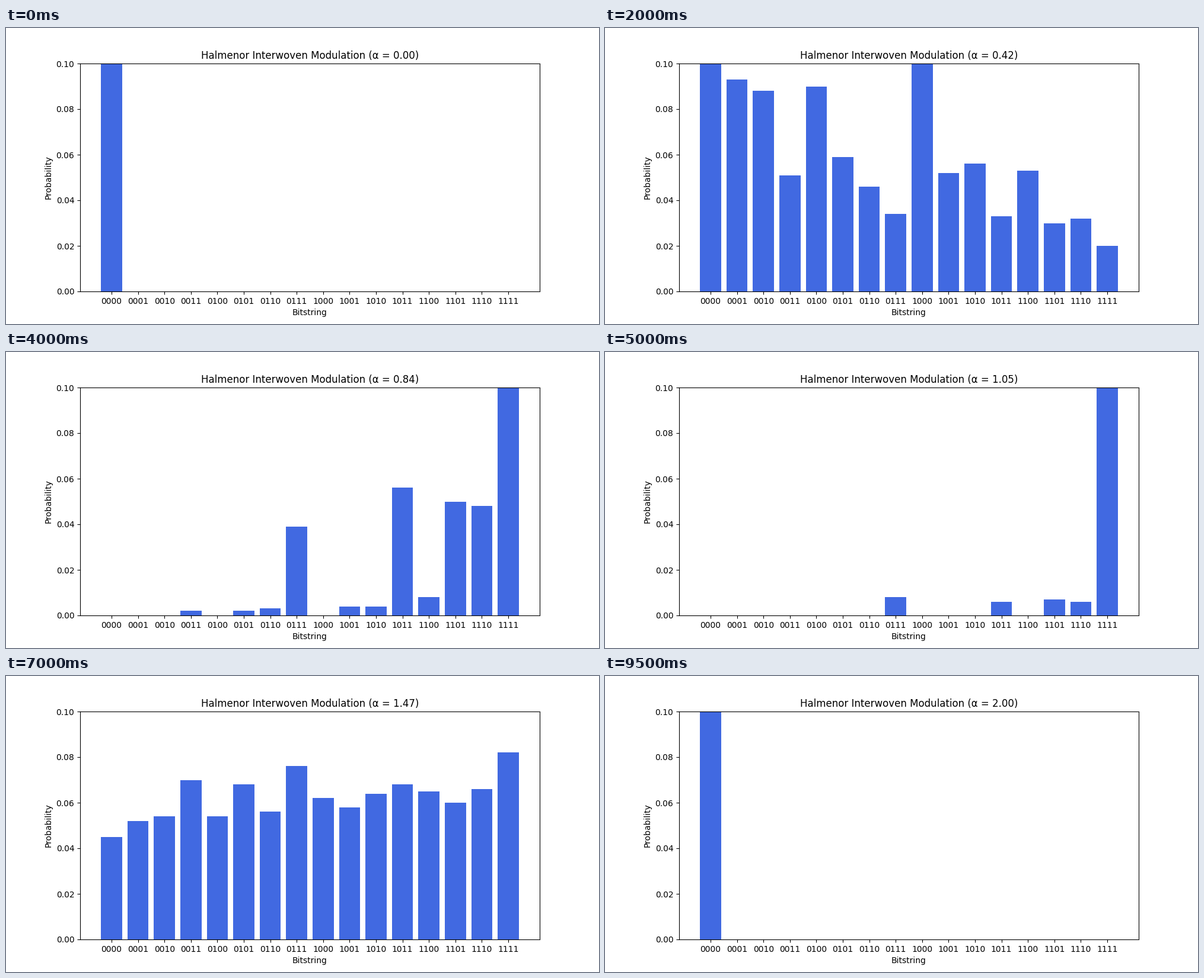
Animation, 1000 px wide and 500 px high, one loop 10 s. Source, as a matplotlib script:

```python
import numpy as np
import matplotlib.pyplot as plt
from matplotlib.animation import FuncAnimation

FRAMES = 20
QUBITS = 4
SHOTS = 2000
SEED = 100
ALPHAS = np.linspace(0, 2, FRAMES)
STATES = [format(i, f"0{QUBITS}b") for i in range(2 ** QUBITS)]
ONES = np.array([s.count("1") for s in STATES])


def measure(step):
    """Sampled probabilities after rotating every qubit by alpha * pi."""
    p = np.sin(np.pi * ALPHAS[step] / 2) ** 2
    probs = p ** ONES * (1 - p) ** (QUBITS - ONES)
    rng = np.random.default_rng(SEED + step)
    counts = rng.multinomial(SHOTS, probs / probs.sum())
    return np.round(counts / SHOTS, 3)


fig, ax = plt.subplots(figsize=(10, 5), dpi=100)
bars = ax.bar(STATES, np.zeros(len(STATES)), color="royalblue")
ax.set_ylim(0, 0.1)
ax.set_xlabel("Bitstring")
ax.set_ylabel("Probability")
title = ax.set_title("")


def update(step):
    for bar, height in zip(bars, measure(step)):
        bar.set_height(height)
    title.set_text(f"Halmenor Interwoven Modulation (α = {ALPHAS[step]:.2f})")
    return [*bars, title]


anim = FuncAnimation(fig, update, frames=FRAMES, interval=500,
                     repeat=True, repeat_delay=0, blit=False)
plt.show()
```
